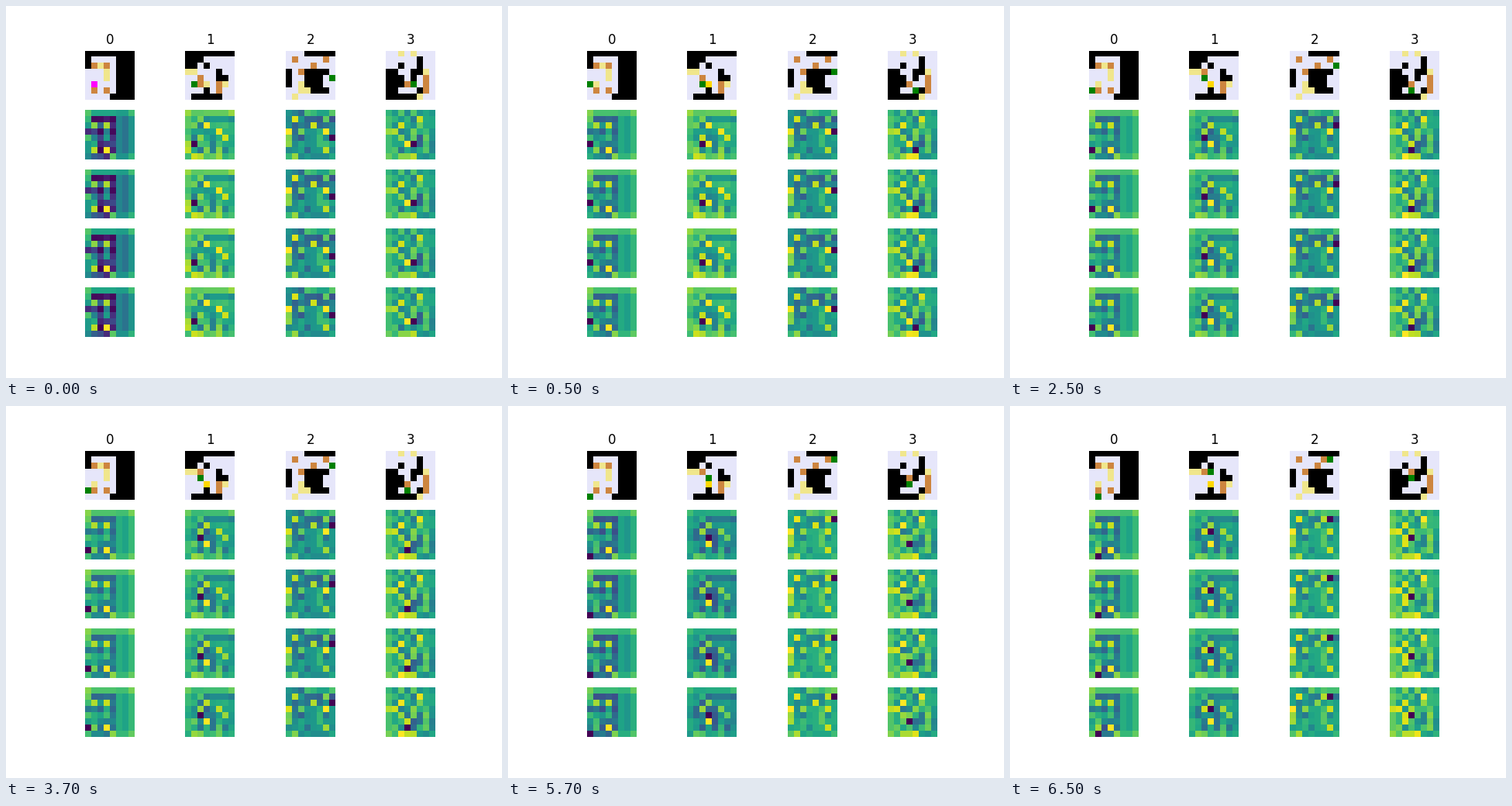
A matplotlib script that plays this animation: 640 by 480 pixels, repeating every 8000 ms.

```python
from itertools import product

import numpy as np
import matplotlib.pyplot as plt
from matplotlib.animation import FuncAnimation
from matplotlib.colors import to_rgb

SIZE = 8
STEP = {"L": (-1, 0), "R": (1, 0), "U": (0, -1), "D": (0, 1)}
y, x = np.mgrid[:SIZE, :SIZE]


def block(left, right, top, bottom):
    return (x >= left) & (x <= right) & (y >= top) & (y <= bottom)


def kernel(center, side, slope_x, slope_y, corner):
    """3x3 influence: a tilted plane around a peak, scaled at its corners."""
    dy, dx = np.mgrid[-1:2, -1:2]
    plane = side + slope_x * dx + slope_y * dy
    plane[np.abs(dx * dy) == 1] *= corner
    plane[1, 1] = center
    return plane


WALL = kernel(.5, -.15, .08, -.12, 0)
BOX = kernel(.5, -.2, .075, -.075, .6)
TARGET = kernel(.25, -.1, 0, -.08, 0)
PLAYER = kernel(-.75, .03, -.15, .05, 1)

# Sokoban rooms: walls as conditions on x and y, the rest as (x, y) cells.
LEVELS = [
    dict(walls=(y == 0) | (x > 4) | (x == 0) & (y < 3) | (x == 4) & (y == 7),
         boxes=list(product((1, 3), (2, 6))),
         targets=[(2, 2), (3, 3), (3, 4), (1, 5)],
         player=(1, 5), moves="LDDR"),
    dict(walls=(y == 0) | (x + y < 4) & (y < 3) | (x == 3) & (y % 4 == 2)
         | block(5, 6, 3, 4) & (x - y < 3) | block(1, 5, 7, 7),
         boxes=list(product((2,), (4, 5))) + list(product((5,), (5, 6))),
         targets=[(0, 3), (1, 3), (3, 5), (6, 5)],
         player=(1, 5), moves="RURU"),
    dict(walls=(y == 0) & (x > 2) | block(0, 0, 3, 5)
         | block(3, 6, 3, 6) & (x - y > -3) & ~block(6, 6, 4, 5),
         boxes=[(1, 1), (6, 1), (4, 2), (2, 3)],
         targets=[(2, 5), (2, 6), (3, 6), (1, 7)],
         player=(7, 4), moves="UUUL"),
    dict(walls=(x < 2) & (y > 2) | (x < 5) & (y == 7) | block(5, 5, 1, 3)
         | block(4, 4, 3, 4) | block(2, 2, 4, 5)
         | (x == y) & (x == 2) | (x == 5) & (y == 6),
         boxes=[(3, 5)] + list(product((6,), (4, 5, 6))),
         targets=[(2, 0), (4, 0), (6, 3), (5, 7)],
         player=(4, 5), moves="DLUU"),
]


def state_after(level, count):
    """Player and boxes after the first `count` moves."""
    player, boxes = level["player"], list(level["boxes"])
    for move in level["moves"][:count]:
        dx, dy = STEP[move]
        player = (player[0] + dx, player[1] + dy)
        if player in boxes:
            boxes[boxes.index(player)] = (player[0] + dx, player[1] + dy)
    return player, boxes


def board_image(level, player, boxes):
    image = np.empty((SIZE, SIZE, 3))
    image[:] = to_rgb("lavender")
    image[level["walls"]] = to_rgb("black")
    targets = level["targets"]

    def paint(cells, color, on_target):
        for col, row in cells:
            image[row, col] = to_rgb(on_target if (col, row) in targets
                                     else color)

    paint(targets, "khaki", "khaki")
    paint(boxes, "peru", "gold")
    paint([player], "green", "magenta")
    return image


def heat_map(level, player, boxes):
    field = np.zeros((SIZE + 2, SIZE + 2))

    def add(cells, influence):
        for col, row in cells:
            field[row:row + 3, col:col + 3] += influence

    add(zip(x[level["walls"]], y[level["walls"]]), WALL)
    add(boxes, BOX)
    add(level["targets"], TARGET)
    np.maximum(field, -.45, out=field)
    add([player], PLAYER)
    heat = field[1:-1, 1:-1]
    if player in level["targets"]:
        heat[player[1], player[0]] -= PLAYER[1, 1]
    border_x = (x == 0) * 1 - (x == SIZE - 1)
    border_y = (y == SIZE - 1) * 1 - (y == 0)
    return heat + .1 * (border_x + border_y)


fig, axes = plt.subplots(5, 4, figsize=(6.4, 4.8), dpi=100)
pictures = []
for col, level in enumerate(LEVELS):
    start = state_after(level, 0)
    axes[0, col].set_title(str(col))
    column = [axes[0, col].imshow(board_image(level, *start))]
    column += [ax.imshow(heat_map(level, *start), cmap="viridis")
               for ax in axes[1:, col]]
    pictures.append(column)
for ax in axes.flat:
    ax.axis("off")


def update(frame):
    count = (frame + 3) // 4
    for level, (board, *heats) in zip(LEVELS, pictures):
        state = state_after(level, count)
        board.set_data(board_image(level, *state))
        heat = heat_map(level, *state)
        for picture in heats:
            picture.set_data(heat)
            picture.set_clim(heat.min(), heat.max())
    return [picture for column in pictures for picture in column]


animation = FuncAnimation(fig, update, frames=16, interval=500, repeat=True,
                          repeat_delay=0, blit=False)
plt.show()
```
